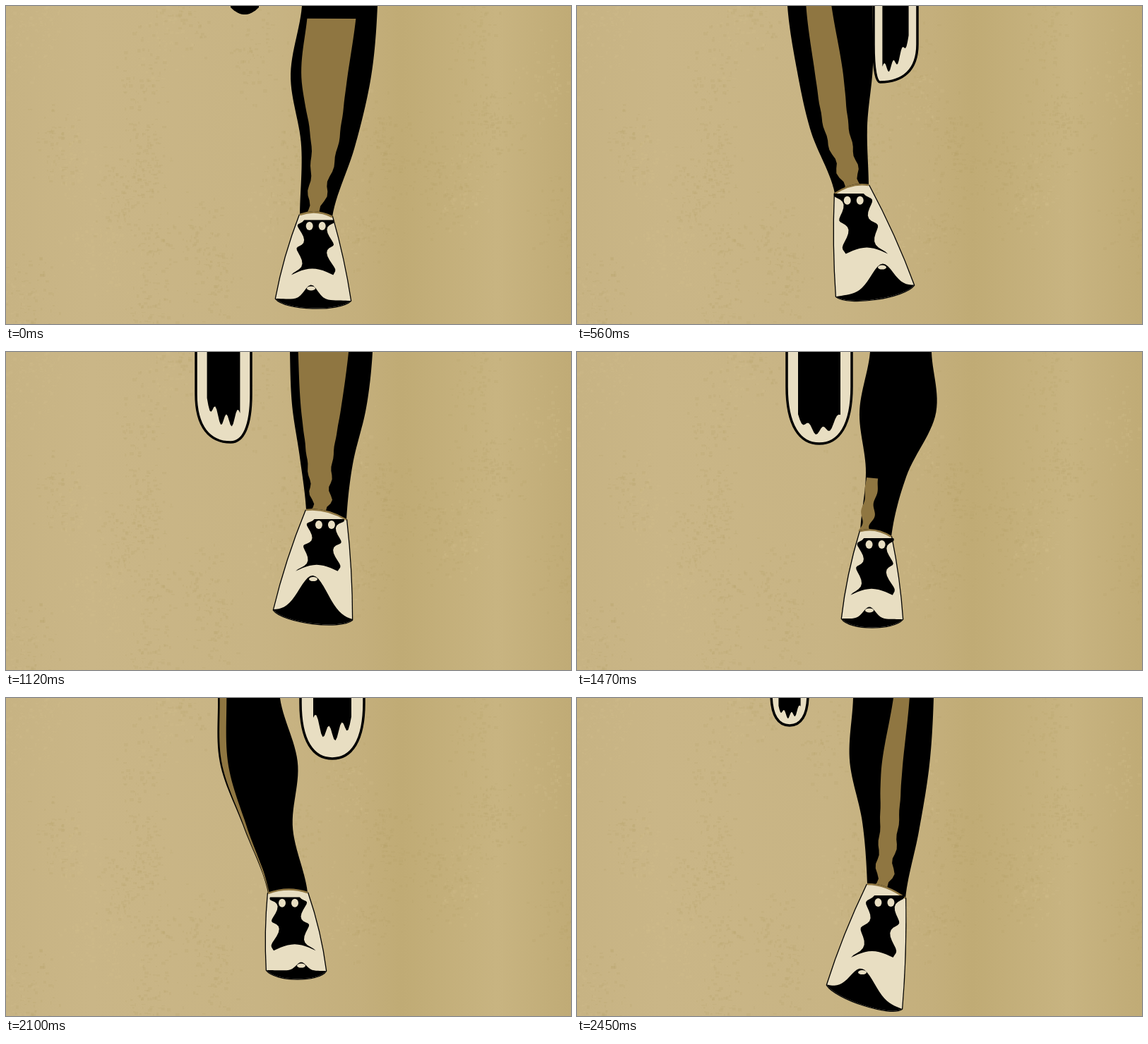
These frames come from a looping animation (800x451 px, 2520 ms). An HTML page with a canvas:

```html
<!DOCTYPE html>
<html lang="en">
<head>
<meta charset="utf-8">
<title>Running legs</title>
<style>
  html, body { margin: 0; width: 100%; height: 100%; overflow: hidden; background: #c6b180; }
  canvas { display: block; width: 100%; height: 100%; }
</style>
</head>
<body>
<canvas id="stage" width="800" height="451"></canvas>
<script>
const W = 800, H = 451, STEP = 70, STRIDE = 18, MIRROR = 826;
const BLACK = '#000', CREAM = '#e8dec2', SKIN = '#8f7641';
const ctx = document.getElementById('stage').getContext('2d');

// Planted poses, seen as a right leg.
// left/right: edge x at even steps from the top to the ankle; ankle: y of both ends.
// band: skin light as shares of the leg width (top from/to, ankle from/to, start).
// toe: both toe corners; arch: x, height and spread of the dark sole.
const reach = {
  left: [402, 405, 416, 425], right: [519, 510, 491, 482], ankle: [224, 238],
  band: [.1, .71, .15, .57, 0], toe: [379, 366, 490, 380], arch: [435, 56, 28]
};
const landR = {
  left: [391, 386, 404, 411], right: [505, 499, 484, 465], ankle: [264, 284],
  band: [.5, .7, .22, .6, 0], toe: [354, 407, 460, 441], arch: [404, 39, 24]
};
const landL = {
  left: [408, 407, 415, 413], right: [528, 515, 495, 461], ankle: [254, 266],
  band: [.48, .78, .25, .75, 0], toe: [349, 396, 459, 412], arch: [394, 37, 22]
};
const stand = {
  left: [419, 403, 418, 416], right: [526, 517, 494, 462], ankle: [296, 299],
  band: [.08, .73, .24, .66, .06], toe: [382, 415, 488, 418], arch: [432, 21, 13]
};
const passR = {
  left: [415, 400, 409, 401], right: [502, 508, 467, 445], ankle: [254, 262],
  band: [.05, .28, 0, .35, .7], toe: [375, 378, 461, 379], arch: [414, 17, 12]
};
const passL = {
  left: [438, 413, 420, 399], right: [526, 523, 489, 455], ankle: [276, 277],
  band: [.86, .97, .97, .99, 0], toe: [373, 387, 457, 386], arch: [408, 12, 10]
};

// Raised shoe: side edges, lowest y, place of the tip, pale rim.
const raised = (left, right, bottom, tip, rim) => ({ foot: [left, right, bottom, tip, rim] });
const apex = raised(468, 508, 12, .5, 0);

const sides = [
  {
    lead: 2, flip: false,
    planted: [[0, reach], [1, landR], [2, stand], [5, passR]],
    swing: [[9, raised(428, 500, 145, .3, 20)], [10, raised(420, 482, 110, .15, 18)],
            [11, apex], [14, raised(417, 507, 88, .5, 30)]]
  },
  {
    lead: 11, flip: true,
    planted: [[0, reach], [1, landL], [2, stand], [5, passL]],
    swing: [[9, raised(479, 557, 130, .37, 26)], [10, raised(499, 551, 41, .5, 13)],
            [11, apex], [14, raised(437, 529, 132, .5, 16)]]
  }
];

const lerp = (a, b, t) => a + (b - a) * t;

function poseAt(keys, time) {
  const next = keys.findIndex(([at]) => at >= time);
  if (next < 1) return keys[next < 0 ? keys.length - 1 : 0][1];
  const [t0, a] = keys[next - 1], [t1, b] = keys[next];
  const t = (time - t0) / (t1 - t0), mixed = {};
  for (const part in a) mixed[part] = a[part].map((v, i) => lerp(v, b[part][i], t));
  return mixed;
}

// Smooth curve through evenly spaced values.
function curve(values, s) {
  const last = values.length - 1, i = Math.min(last - 1, Math.floor(s * last)), t = s * last - i;
  const v = k => values[Math.max(0, Math.min(last, i + k))];
  const m0 = (v(1) - v(-1)) / 2, m1 = (v(2) - v(0)) / 2, d = v(1) - v(0);
  return v(0) + t * (m0 + t * (3 * d - 2 * m0 - m1 + t * (m0 + m1 - 2 * d)));
}

function sample(n, point) {
  return Array.from({ length: n + 1 }, (_, i) => point(i / n));
}

function fill(points, color) {
  ctx.beginPath();
  points.forEach(([x, y]) => ctx.lineTo(x, y));
  ctx.fillStyle = color;
  ctx.fill();
}

function oval(x, y, rx, ry) {
  ctx.beginPath();
  ctx.ellipse(x, y, rx, ry, 0, 0, Math.PI * 2);
  ctx.fillStyle = CREAM;
  ctx.fill();
}

function drawLeg({ left, right, ankle, band }) {
  const across = (s, f) => [
    lerp(curve(left, s), curve(right, s), f),
    s * lerp(ankle[0], ankle[1], f)
  ];
  const strip = (start, from, to) => [
    ...sample(40, t => across(lerp(start, 1, t), from(lerp(start, 1, t)))),
    ...sample(40, t => across(lerp(1, start, t), to(lerp(1, start, t))))
  ];
  fill(strip(0, () => 0, () => 1), BLACK);
  const [f0, t0, f1, t1, start] = band;
  const ripple = s => .08 * Math.sin(s * 48) * s ** 6 * Math.min(1, (t1 - f1) * 3);
  fill(strip(start, s => lerp(f0, f1, s) + ripple(s), s => lerp(t0, t1, s) + ripple(s + .05)), SKIN);
}

function drawShoe({ left, right, ankle, toe, arch }) {
  const [lx, ly, rx, ry] = toe, [ax, height, spread] = arch;
  const [cl, cr] = [left[3], right[3]], [yl, yr] = ankle;
  const sole = () => ctx.bezierCurveTo(lerp(lx, rx, .12), lerp(ly, ry, .12) + 16,
    lerp(lx, rx, .85), lerp(ly, ry, .85) + 16, rx, ry);
  ctx.lineJoin = 'round';

  ctx.beginPath();
  ctx.moveTo(cl, yl);
  ctx.quadraticCurveTo((cl + lx) / 2 - 6, (yl + ly) / 2, lx, ly);
  sole();
  ctx.quadraticCurveTo((cr + rx) / 2 + 4, (yr + ry) / 2, cr, yr);
  ctx.quadraticCurveTo((cl + cr) / 2, (yl + yr) / 2 - 10, cl, yl);
  ctx.fillStyle = CREAM;
  ctx.strokeStyle = BLACK;
  ctx.lineWidth = 2.6;
  ctx.stroke();
  ctx.fill();

  ctx.beginPath();
  ctx.moveTo(cl, yl);
  ctx.quadraticCurveTo((cl + cr) / 2, (yl + yr) / 2 - 10, cr, yr);
  ctx.strokeStyle = SKIN;
  ctx.stroke();

  const top = sample(30, t => {
    const x = lerp(lx, rx, t);
    return [x, lerp(ly, ry, t) - height * Math.exp(-(((x - ax) / spread) ** 2))];
  });
  ctx.beginPath();
  ctx.moveTo(lx, ly);
  sole();
  top.reverse().forEach(p => ctx.lineTo(...p));
  ctx.fillStyle = BLACK;
  ctx.fill();
  oval(ax, lerp(ly, ry, (ax - lx) / (rx - lx)) - height + 5, 6, 3);

  // Laces: a ragged dark tongue from the collar to the toe cap.
  const y0 = (yl + yr) / 2 + 3, y1 = lerp(y0, (ly + ry) / 2, .75 - height / 250);
  const mid = t => lerp((cl + cr) / 2, (lx + rx) / 2, t * .55);
  const rag = (side, t) => [
    mid(t) + side * (21 + 5 * Math.sin(t * 15 + side) + 7 * t ** 6),
    lerp(y0, y1, t) + 3 * Math.cos(t * 15) + 6 * t ** 6
  ];
  fill([
    ...sample(24, t => rag(-1, t)),
    ...sample(12, t => [lerp(rag(-1, 1)[0], rag(1, 1)[0], t), rag(1, 1)[1] - 9 * Math.sin(t * Math.PI)]),
    ...sample(24, t => rag(1, 1 - t))
  ], BLACK);
  for (const side of [-1, 1]) oval(mid(.15) + side * 9, lerp(y0, y1, .15), 5, 6);
}

function drawRaised({ foot: [l, r, bottom, tip, rim] }) {
  const w = r - l, x = lerp(l, r, tip), inset = Math.min(w * .2, rim);
  ctx.beginPath();
  ctx.moveTo(l, -40);
  ctx.lineTo(l, bottom - w * .9);
  ctx.bezierCurveTo(l, bottom - w * .3, lerp(x, l, .6), bottom - 2, x, bottom - 2);
  ctx.bezierCurveTo(lerp(x, r, .6), bottom - 2, r, bottom - w * .3, r, bottom - w * .9);
  ctx.lineTo(r, -40);
  ctx.fillStyle = rim ? CREAM : BLACK;
  ctx.strokeStyle = BLACK;
  ctx.lineWidth = 3.5;
  ctx.fill();
  ctx.stroke();

  const jag = t => bottom - rim * (1.25 + .35 * Math.sin(t * 19)) - w * (t - tip) ** 2;
  fill([
    [l + inset, -40],
    ...sample(24, t => [lerp(l + inset, r - inset, t), jag(t)]),
    [r - inset, -40]
  ], BLACK);
}

function drawSide({ flip, planted, swing }, phase) {
  ctx.save();
  if (flip) ctx.transform(-1, 0, 0, 1, MIRROR, 0);
  if (phase >= 9 && phase <= 14) {
    drawRaised(poseAt(swing, phase));
  } else {
    // Quadratic lift before touchdown and after push-off.
    const before = phase > 14 ? STRIDE - phase : 0, after = Math.max(0, phase - 5);
    const lift = before || (phase < 9 ? after : 0);
    ctx.translate(5 * lift ** 2, -20 * lift ** 2);
    const pose = poseAt(planted, before ? 0 : phase);
    drawLeg(pose);
    drawShoe(pose);
  }
  ctx.restore();
}

function makePaper() {
  const paper = document.createElement('canvas');
  paper.width = W;
  paper.height = H;
  const g = paper.getContext('2d');
  const base = g.createLinearGradient(0, 0, W, 0);
  [[0, '#c7b383'], [.15, '#cab687'], [.45, '#c8b484'], [.63, '#c4af7c'],
   [.7, '#c0ab75'], [.87, '#c8b481'], [1, '#c0ab76']]
    .forEach(([at, color]) => base.addColorStop(at, color));
  g.fillStyle = base;
  g.fillRect(0, 0, W, H);

  let seed = 7;
  const rnd = () => (seed = seed * 16807 % 2147483647) / 2147483647;
  const spread = r => (rnd() + rnd() + rnd() - 1.5) * r;
  for (let patch = 0; patch < 36; patch++) {
    const x = rnd() * W, y = rnd() * H;
    g.fillStyle = patch % 3 ? 'rgba(176,152,97,.15)' : 'rgba(208,188,142,.2)';
    for (let i = 0; i < 70; i++) {
      g.fillRect(x + spread(35) | 0, y + spread(60) | 0, 1 + rnd() * 5, 1 + rnd() * 4);
    }
  }
  return paper;
}

const paper = makePaper();

function render(now) {
  const beat = Math.floor(now / STEP) % STRIDE;
  ctx.drawImage(paper, 0, 0);
  // The leg closest to touchdown is in front.
  const depth = phase => (phase + 3) % STRIDE;
  sides.map(side => ({ side, phase: (beat + side.lead) % STRIDE }))
    .sort((a, b) => depth(b.phase) - depth(a.phase))
    .forEach(({ side, phase }) => drawSide(side, phase));
}

let start;
function tick(now) {
  start ??= now;
  render(now - start);
  requestAnimationFrame(tick);
}
render(0);
requestAnimationFrame(tick);
</script>
</body>
</html>
```
